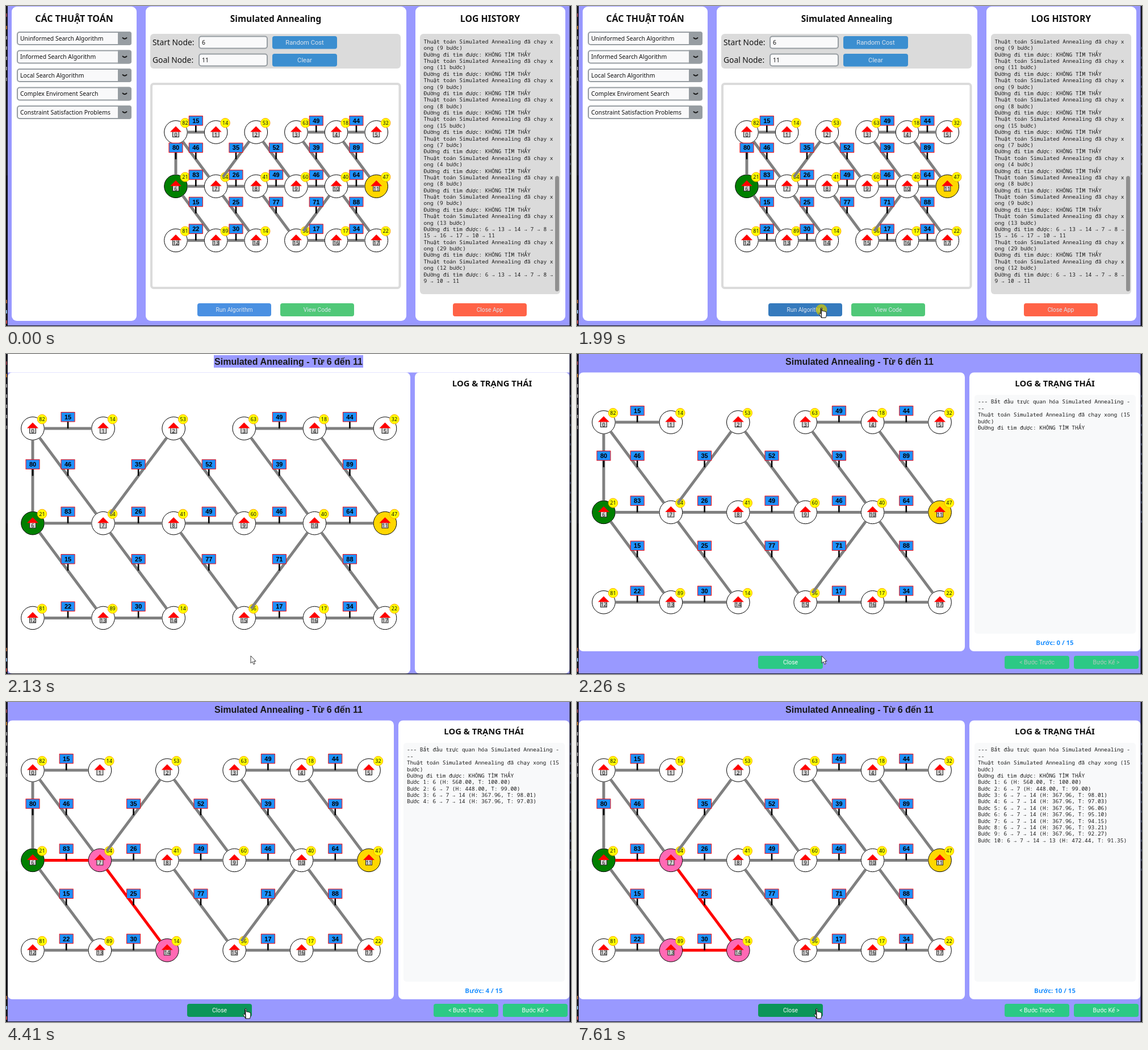
These frames come from a looping animation (995x563 px, 8 s). An HTML page:

```html
<!DOCTYPE html>
<html lang="vi">
<head>
<meta charset="utf-8">
<title>Simulated Annealing</title>
<style>
html, body { margin: 0; width: 100%; height: 100%; overflow: hidden; background: #9999ff; }
svg { display: block; width: 100vw; height: 100vh; }
text { white-space: pre; }
.ui { font-family: "Noto Sans", "Open Sans", sans-serif; }
.btn { font-family: Roboto, sans-serif; }
.arial { font-family: "Liberation Sans", Arial, sans-serif; }
.mono { font-family: "Noto Sans Mono", "DejaVu Sans Mono", monospace; }
.bold { font-weight: bold; }
</style>
</head>
<body>
<svg viewBox="0 0 995 563">
  <g id="scene"></g>
  <g id="cursor">
    <circle id="halo" cx="0" cy="4" r="10" fill="#d2c800" opacity=".72"/>
    <path id="arrow" d="M0 0V13L3 10.3L5 15L7.3 14L5.3 9.5H9Z" fill="#fff" stroke="#222" stroke-width=".9"/>
    <path id="hand" d="M-1.3 1.2Q0-.8 1.3 1.2V6.2Q2.8 5 4 6.7Q5.5 5.6 6.5 7.2Q8.7 6.6 8.8 9V13Q8.6 15 7.5 18H0Q-1-14.5 0 18L-4 11.5Q-4.4 9-1.3 11Z" fill="#fff" stroke="#111"/>
  </g>
</svg>
<script>
const $ = id => document.getElementById(id);
const LILAC = '#9999ff', GREY = '#dbdbdb', SLATE = '#979da2';

const rect = (x0, y0, x1, y1, fill, r = 0, extra = '') =>
  `<rect x="${x0}" y="${y0}" width="${x1 - x0}" height="${y1 - y0}" rx="${r}" fill="${fill}" ${extra}/>`;
const line = (x0, y0, x1, y1, color, width) =>
  `<path d="M${x0} ${y0}L${x1} ${y1}" stroke="${color}" stroke-width="${width}"/>`;
const circle = (x, y, r, fill, stroke) =>
  `<circle cx="${x}" cy="${y}" r="${r}" fill="${fill}" stroke="${stroke}"/>`;
const esc = s => String(s).replace(/&/g, '&amp;').replace(/</g, '&lt;');
// y is the vertical middle of the capitals
const text = (x, y, s, size, cls = 'ui', fill = '#111', anchor = 'middle') =>
  `<text x="${x}" y="${y + size * .36}" font-size="${size}" class="${cls}" fill="${fill}" text-anchor="${anchor}">${esc(s)}</text>`;
const button = (x, y, w, h, label, fill, size, color = '#dce4ee') =>
  rect(x, y, x + w, y + h, fill, 4) + text(x + w / 2, y + h / 2, label, size, 'btn', color);
const logText = (x, y, lines) =>
  lines.map((s, i) => text(x, y + i * 11.38, s, 9.5, 'mono', '#1a1a1a', 'start')).join('');

// Graph
const heur = [82, 14, 53, 63, 18, 32, 21, 84, 41, 60, 40, 47, 81, 89, 14, 56, 17, 22];
const edges = `0-1-15 0-6-80 0-7-46 2-7-35 2-9-52 3-4-49 3-10-39 4-5-44 4-11-89 6-7-83 7-8-26 8-9-49
  9-10-46 10-11-64 6-13-15 7-14-25 8-15-77 10-15-71 10-17-88 12-13-22 13-14-30 15-16-17 16-17-34`
  .split(/\s+/).map(e => e.split('-').map(Number));

function graph(x0, y0, dx, dy, path = []) {
  const pos = i => [x0 + i % 6 * dx, y0 + Math.floor(i / 6) * dy];
  const color = i => i === 6 ? '#008000' : i === 11 ? '#ffd700' : path.includes(i) ? '#ff69b4' : '#fff';
  const nodes = heur.map((h, i) => {
    const [x, y] = pos(i);
    return circle(x, y, 20.3, color(i), '#000') +
      rect(x - 5.5, y - 2, x + 5.5, y + 8.5, '#d3d3d3', 0, 'stroke="#222"') +
      `<path d="M${x - 10} ${y - .5}L${x} ${y - 10.5}L${x + 10} ${y - .5}Z" fill="#f00"/>` +
      text(x, y + 4.3, i, 9) +
      circle(x + 16.5, y - 16.3, 8.2, '#ff0', '#ffa500') + text(x + 16.5, y - 16.3, h, 9);
  });
  const links = edges.map(([a, b]) => {
    const [ax, ay] = pos(a), [bx, by] = pos(b);
    const d = Math.hypot(bx - ax, by - ay), ux = (bx - ax) / d * 20.5, uy = (by - ay) / d * 20.5;
    const onPath = path.some((n, i) => i && Math.min(n, path[i - 1]) === a && Math.max(n, path[i - 1]) === b);
    return line(ax + ux, ay + uy, bx - ux, by - uy, onPath ? '#f00' : '#808080', 5);
  });
  const signs = edges.map(([a, b, cost]) => {
    const [ax, ay] = pos(a), [bx, by] = pos(b), x = (ax + bx) / 2, y = (ay + by) / 2;
    return line(x, y - 12, x, y, '#000', 2.6) +
      rect(x - 12, y - 28.5, x + 12, y - 12, '#1e90ff', 0, 'stroke="#f00"') +
      text(x, y - 20.2, cost, 11, 'arial bold', '#000');
  });
  return [...nodes, ...links, ...signs].join('');
}

// Slivers of the window behind the app
const edgeStrips = rect(0, 0, 3, 563, '#17171f') + rect(0, 298, 3, 520, '#0d0d13') + rect(992.5, 0, 995, 563, '#15151c') +
  rect(0, 562, 995, 563, '#15151c') +
  [[16, '#a04050'], [38, '#d08030'], [56, '#aaa'], [74, '#aaa'], [92, '#aaa'], [110, '#aaa'], [129, '#888'],
   [520, '#c07040'], [538, '#9cf'], [556, '#e05050']].map(([y, c]) => rect(0, y - 3, 1.6, y + 3, c)).join('') +
  Array.from({ length: 14 }, (_, i) => rect(993.5, 72 + i * 17, 995, 76 + i * 17, '#3a4460')).join('');
const backdrop = rect(0, 0, 995, 563, LILAC);

// Main window
const menus = ['Uninformed Search Algorithm', 'Informed Search Algorithm', 'Local Search Algorithm',
  'Complex Enviroment Search', 'Constraint Satisfaction Problems'];
const NOT_FOUND = 'Đường đi tìm được: KHÔNG TÌM THẤY';
const found = {
  13: ['Đường đi tìm được: 6 → 13 → 14 → 7 → 8 →', '15 → 16 → 17 → 10 → 11'],
  12: ['Đường đi tìm được: 6 → 13 → 14 → 7 → 8 →', '9 → 10 → 11']
};
const history = [9, 11, 9, 8, 15, 7, 4, 8, 9, 13, 29, 12].flatMap(n =>
  ['Thuật toán Simulated Annealing đã chạy x', `ong (${n} bước)`, ...(found[n] || [NOT_FOUND])]);

const menu = (label, i) => {
  const y = 57 + i * 32.5;
  return rect(20, y - 11, 220, y + 11, '#f9f9fa', 4, `stroke="${SLATE}" stroke-width="2"`) +
    `<path d="M197 ${y - 12}h20q4 0 4 4v16q0 4-4 4h-20z" fill="${SLATE}"/>` +
    `<path d="M205.5 ${y - 1}q3.5 3.5 7 0" fill="none" stroke="#1a1a1a" stroke-width="1.8" stroke-linecap="round"/>` +
    text(25, y, label, 10.4, 'ui', '#111', 'start');
};
const field = (y, label, value) => text(258, y, label, 13.8, 'ui', '#111', 'start') +
  rect(340, y - 10.5, 460, y + 10.5, '#f9f9fa', 4, `stroke="${SLATE}" stroke-width="2"`) +
  text(345, y, value, 10.4, 'ui', '#111', 'start');

const mainWindow = hover => backdrop +
  rect(10, 1, 230, 554, '#fff', 9) + rect(246, 1, 705, 554, '#fff', 9) + rect(721, 1, 985, 554, '#fff', 9) +
  text(120, 22.5, 'CÁC THUẬT TOÁN', 16, 'ui bold') + menus.map(menu).join('') +
  text(475, 22.5, 'Simulated Annealing', 15.4, 'ui bold') +
  rect(254, 49, 695, 110, GREY, 6) + field(64, 'Start Node:', 6) + field(95, 'Goal Node:', 11) +
  button(469, 53, 114, 22.5, 'Random Cost', '#3b8ed0', 11.2) + button(469, 84, 114, 22.5, 'Clear', '#3b8ed0', 11.2) +
  rect(256, 137, 693.5, 496, '#fff', 4, `stroke="${GREY}" stroke-width="4"`) +
  graph(299, 222, 70.65, 95.2) +
  button(337, 523, 130, 23, 'Run Algorithm', hover ? '#357abd' : '#4a90e2', 10.3) +
  button(483, 523, 130, 23, 'View Code', '#50c878', 10.3) +
  text(852.5, 22.5, 'LOG HISTORY', 15.8, 'ui bold') +
  rect(729, 49, 976, 507, GREY, 6) + logText(735.5, 62.5, history) + rect(967, 299, 974, 502, '#8f8f8f', 3.5) +
  button(787, 523, 130, 23, 'Close App', '#ff6347', 10.3);

// Step viewer
const title = text(497.5, 13, 'Simulated Annealing - Từ 6 đến 11', 16, 'arial bold', '#1a1a1a');
const blankWindow = backdrop + rect(3, 0, 992.5, 32.5, '#fff') + rect(366, 2, 629, 24, LILAC);
const openingWindow = blankWindow + title + rect(3, 32.5, 712, 562, '#fff', 8) + rect(720, 32.5, 992.5, 562, '#fff', 8) +
  text(856, 52, 'LOG & TRẠNG THÁI', 14.8, 'ui bold') + graph(47, 131, 124.1, 166.7);

const route = n => [6, 7, 14, 13].slice(0, n < 4 ? n : n < 10 ? 3 : 4);
const energy = ['0', '560.00', '448.00', '367.96', '472.44'];
const stepLine = (_, i) => {
  const r = route(i + 1);
  return `Bước ${i + 1}: ${r.join(' → ')} (H: ${energy[r.length]}, T: ${(100 * .99 ** i).toFixed(2)})`;
};
const viewer = (step, hover) => {
  const green = (x, label, on = true, fill = '#2cc985') =>
    button(x, 531, 114, 23, label, fill, 10.4, on ? '#fafafa' : '#b4c8be');
  return backdrop + title + rect(3, 32.5, 683, 523, '#fff', 8) + rect(691, 32.5, 992.5, 523, '#fff', 8) +
    graph(47, 120, 118.4, 158.4, route(step)) +
    text(841.5, 52, 'LOG & TRẠNG THÁI', 14.8, 'ui bold') + rect(700, 72, 984, 492, '#f8f9fa', 5) +
    logText(706, 84, ['--- Bắt đầu trực quan hóa Simulated Annealing -', '--',
      'Thuật toán Simulated Annealing đã chạy xong (15', 'bước)', NOT_FOUND,
      ...Array.from({ length: step }, stepLine)]) +
    text(841.5, 508, `Bước: ${step} / 15`, 11.4, 'ui bold', '#1e90ff') +
    green(319, 'Close', true, hover ? '#0c955a' : undefined) +
    green(753, '< Bước Trước', step > 1) + green(875, 'Bước Kế >', step > 0);
};

// Timeline
const mix = (a, b, k) => a + (b - a) * k;
const ease = (t, t0, t1) => { const k = Math.min(1, Math.max(0, (t - t0) / (t1 - t0))); return k * (2 - k); };

function pointer(t) {
  if (t < 1360) {
    const k = (t - 590) / 770, bez = (a, b, c) => (1 - k) ** 2 * a + 2 * k * (1 - k) * b + k * k * c;
    return [bez(918, 690, 452), bez(545, -230, 430)];
  }
  if (t < 2060) { const k = ease(t, 1360, 1860); return [mix(452, 430.5, k), mix(430, 530.5, k)]; }
  const k = ease(t, 3070, 3410);
  return [mix(431, 422, k), mix(531, 539, k)];
}

let shown = '';
function draw() {
  const t = performance.now() % 8000;
  const [x, y] = pointer(t);
  const hover = t < 2060 ? t > 1360 && y > 523 : t >= 3140;
  const step = t < 2810 ? 0 : Math.min(10, 1 + Math.floor((t - 2809) / 533.4));
  const stage = t < 2060 ? 'main' : t < 2130 ? 'blank' : t < 2260 ? 'opening' : 'viewer';
  const key = stage + step + hover;
  if (key !== shown) {
    shown = key;
    $('scene').innerHTML = (stage === 'main' ? mainWindow(hover) : stage === 'blank' ? blankWindow
      : stage === 'opening' ? openingWindow : viewer(step, hover)) + edgeStrips;
  }
  const show = (id, on) => $(id).setAttribute('visibility', on ? 'visible' : 'hidden');
  $('cursor').setAttribute('transform', `translate(${x} ${y})`);
  show('arrow', t >= 590 && !hover);
  show('hand', hover);
  show('halo', t >= 1920 && t < 2060);
  requestAnimationFrame(draw);
}
draw();
</script>
</body>
</html>
```
